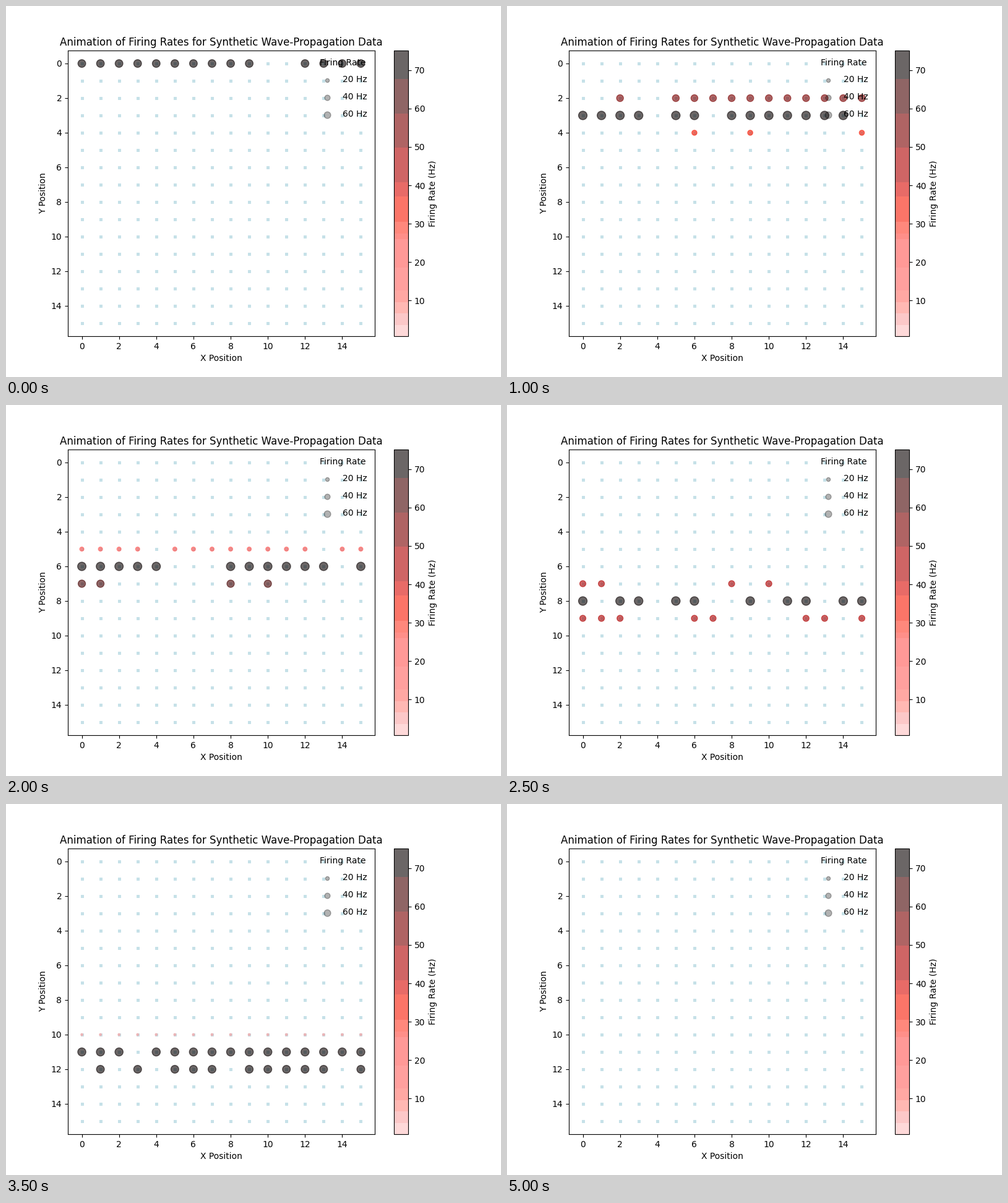
A matplotlib script for the animation above (8 s loop, 800 px wide and 600 px high).

```python
import numpy as np
import matplotlib.pyplot as plt
from matplotlib.animation import FuncAnimation
from matplotlib.cm import ScalarMappable
from matplotlib.colors import ListedColormap, Normalize, to_rgb

SIZE = 16
STEP_MS, STEPS = 250, 32
ALPHA = 0.6
PEAK, HALF_WIDTH, SPEED, START = 100, 1.5, 0.86, -0.6

# Colour bands from low to high rate: tint on white, width in percent.
BANDS = [
    ("#fed9d9", 4), ("#fcc8c8", 4), ("#ffb8b3", 4), ("#ffa8a3", 4),
    ("#ffa09e", 8), ("#ff9997", 10), ("#ff8f89", 2), ("#ff887c", 4),
    ("#fb7568", 9), ("#e86b67", 5), ("#cf6565", 12), ("#af6464", 12),
    ("#8f6565", 12), ("#6b6666", 10),
]

# Columns that fire in each row.
ALL = set(range(SIZE))
ACTIVE = [
    ALL - {10, 11},
    ALL - {1, 5},
    ALL - {0, 1, 3, 4},
    ALL - {4, 7, 15},
    {6, 9, 15},
    ALL - {4, 13},
    ALL - {5, 6, 7, 14},
    {0, 1, 8, 10},
    ALL - {1, 4, 7, 8, 10, 13},
    {0, 1, 2, 6, 7, 12, 13, 15},
    ALL,
    ALL - {3},
    ALL - {0, 2, 4, 8, 14},
    {2, 5, 10, 14},
    {1, 3, 6, 8, 9, 11, 14},
    ALL - {2, 5, 6, 9, 11, 14},
]
CELLS = np.array([(x, y) for y, cols in enumerate(ACTIVE) for x in sorted(cols)])

tints = np.array([to_rgb(c) for c, n in BANDS for _ in range(n)])
inks = np.clip((tints - (1 - ALPHA)) / ALPHA, 0, 1)
norm = Normalize(0.75, 75.07)


def wave(step):
    """Return the firing cells and their strengths."""
    dist = np.abs(CELLS[:, 1] - (SPEED * step + START))
    on = dist < HALF_WIDTH
    return CELLS[on], PEAK * np.cos(np.pi / 2 * dist[on] / HALF_WIDTH)


fig, ax = plt.subplots(figsize=(8, 6), dpi=100)

gx, gy = np.meshgrid(range(SIZE), range(SIZE))
ax.scatter(gx.ravel(), gy.ravel(), s=8, marker="s", color="#c6e1e8",
           linewidths=0.72)

cells, strength = wave(0)
dots = ax.scatter(cells[:, 0], cells[:, 1], s=strength, c=strength,
                  cmap=ListedColormap(inks), norm=norm, alpha=ALPHA)

for hz in (20, 40, 60):
    ax.scatter([], [], s=hz, c="k", alpha=0.3, label=f"{hz} Hz")
ax.legend(title="Firing Rate", loc="upper right", scatterpoints=1,
          frameon=False, labelspacing=1)

ax.set_xlim(-0.75, 15.75)
ax.set_ylim(15.75, -0.75)
ax.set_xticks(range(0, SIZE, 2))
ax.set_yticks(range(0, SIZE, 2))
ax.set_xlabel("X Position")
ax.set_ylabel("Y Position")
ax.set_title("Animation of Firing Rates for Synthetic Wave-Propagation Data")

bar = fig.colorbar(ScalarMappable(norm, ListedColormap(tints)), ax=ax,
                   label="Firing Rate (Hz)")
bar.set_ticks(range(10, 80, 10))


def update(step):
    cells, strength = wave(step)
    dots.set_offsets(cells)
    dots.set_sizes(strength)
    dots.set_array(0.91 * strength)
    return (dots,)


anim = FuncAnimation(fig, update, frames=STEPS, interval=STEP_MS,
                     init_func=lambda: update(0), repeat=True)
plt.show()
```
